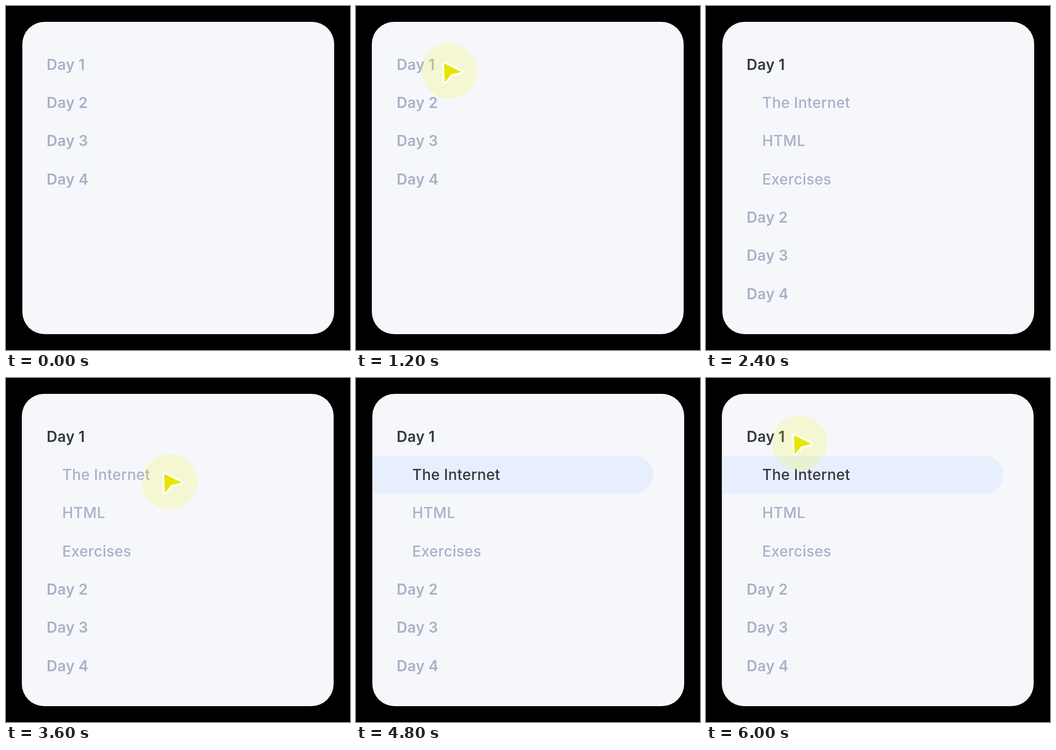
Animation of 652 by 651 pixels, one loop 7200 ms. Source, as an HTML page with a canvas:

```html
<!DOCTYPE html>
<html lang="en">
<head>
<meta charset="utf-8">
<title>Course menu</title>
<style>
  html, body { margin: 0; width: 100%; height: 100%; overflow: hidden; background: #000; }
  canvas { display: block; }
</style>
</head>
<body>
<canvas id="stage" width="652" height="651"></canvas>
<script>
const ctx = document.getElementById('stage').getContext('2d');
const STEP = 1200;
const ROW = 72.35;
const COLORS = { card: '#f6f7fb', muted: '#a9b1c6', active: '#34383f', band: '#e7eefe' };

const ON_DAY = [177, 123];
const ON_TOPIC = [310, 196];
const scenes = [
  {},
  { cursor: ON_DAY },
  { open: true },
  { open: true, cursor: ON_TOPIC },
  { open: true, selected: true },
  { open: true, selected: true, cursor: ON_DAY }
];

const days = ['Day 1', 'Day 2', 'Day 3', 'Day 4'];
const topics = ['The Internet', 'HTML', 'Exercises'];

function roundRect(x, y, w, h, radii, color) {
  ctx.beginPath();
  ctx.roundRect(x, y, w, h, radii);
  ctx.fillStyle = color;
  ctx.fill();
}

function label(text, row, nested, active) {
  ctx.font = `${nested ? 450 : 600} 28px Inter, sans-serif`;
  ctx.letterSpacing = '0.3px';
  ctx.fillStyle = active ? COLORS.active : COLORS.muted;
  ctx.fillText(text, nested ? 106.6 : 77, 120.5 + row * ROW);
}

function drawMenu({ open, selected }) {
  label(days[0], 0, false, open);
  if (open) topics.forEach((t, i) => label(t, i + 1, true, selected && i === 0));
  const shift = open ? topics.length : 0;
  days.slice(1).forEach((d, i) => label(d, i + 1 + shift, false, false));
}

function drawCursor([x, y]) {
  ctx.save();
  ctx.translate(x, y);
  ctx.beginPath();
  ctx.arc(0, 0, 52.3, 0, Math.PI * 2);
  ctx.fillStyle = 'rgba(232, 245, 0, 0.16)';
  ctx.fill();

  const arrow = new Path2D('M-9.3 -13.2 L21 1.8 L3 5.8 L-8.2 19.6 Z');
  ctx.lineJoin = 'round';
  for (const [color, width] of [['#fff', 9], ['#e6e600', 1.6]]) {
    ctx.strokeStyle = ctx.fillStyle = color;
    ctx.lineWidth = width;
    ctx.stroke(arrow);
    ctx.fill(arrow);
  }
  ctx.restore();
}

function draw(time) {
  const scene = scenes[Math.floor(time / STEP) % scenes.length];
  const left = scene.cursor ? 30 : 31;
  ctx.fillStyle = '#000';
  ctx.fillRect(0, 0, 652, 651);
  roundRect(left, 30, 591, 591, 42, COLORS.card);
  if (scene.selected) roundRect(left, 147, 563 - left, 72, [0, 36, 36, 0], COLORS.band);
  drawMenu(scene);
  if (scene.cursor) drawCursor(scene.cursor);
}

const start = performance.now();
function tick() {
  draw(performance.now() - start);
  requestAnimationFrame(tick);
}
tick();
</script>
</body>
</html>
```
